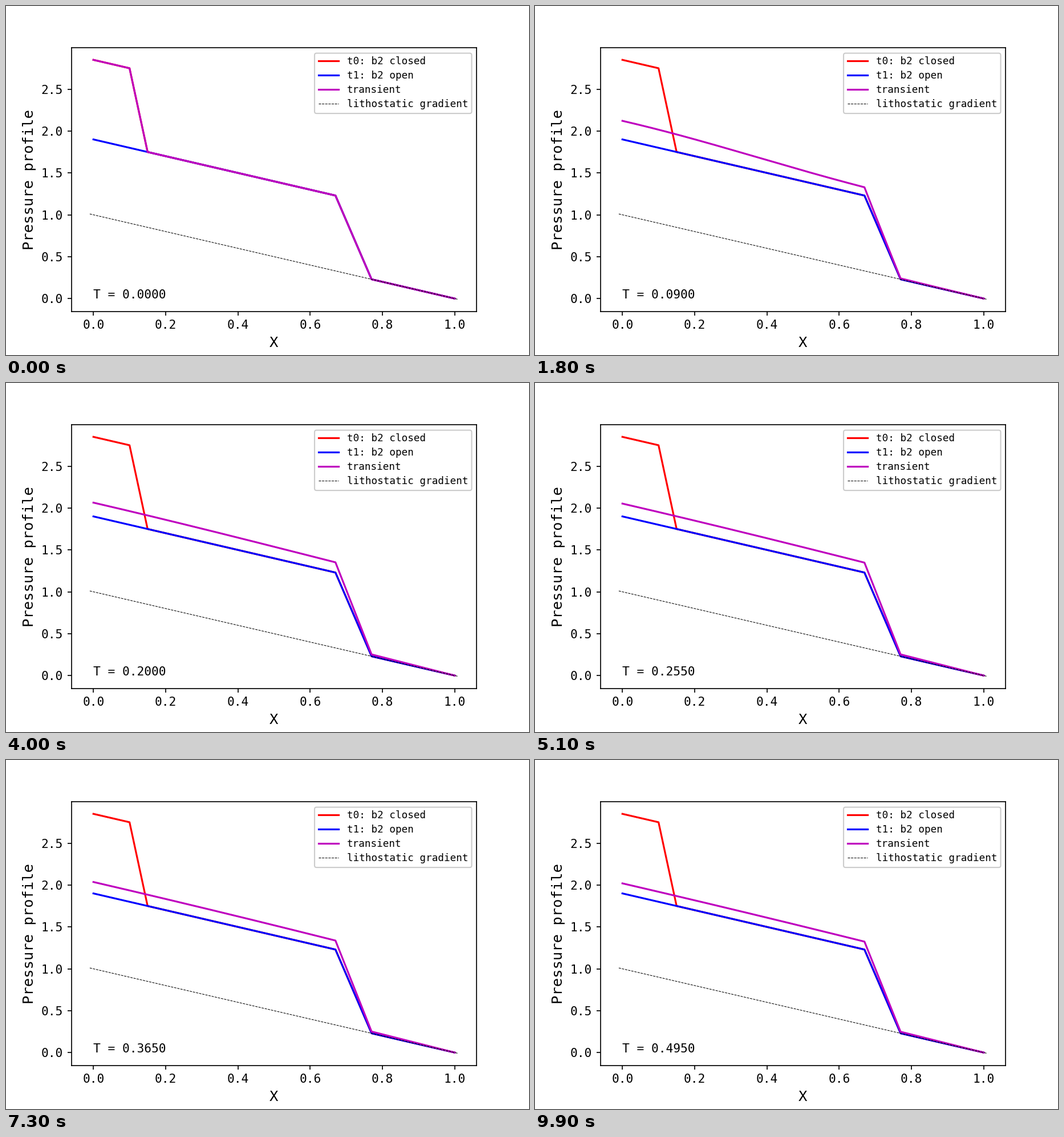
Write a matplotlib script that moves like this. It is 917x611 px and loops after 10000 ms.

```python
import numpy as np
import matplotlib.pyplot as plt
from matplotlib.animation import FuncAnimation
from matplotlib.patches import FancyBboxPatch

W, H, DPI = 917, 611, 152.75
FRAMES, INTERVAL, DT = 100, 100, 0.005

plt.rcParams.update({"font.family": "DejaVu Sans Mono", "font.size": 10})

# Pressure profiles with the second barrier closed and open
N = 200
x = np.linspace(0, 1, N + 1)
closed = np.interp(x, [0, 0.1, 0.15, 0.67, 0.77, 1], [2.85, 2.75, 1.75, 1.23, 0.23, 0])
opened = np.interp(x, [0, 0.67, 0.77, 1], [1.9, 1.23, 0.23, 0])


def diffusion_modes():
    """Decay rates and modes of u_t = (K u_x)_x, with u_x(0) = 0 and u(1) = 0."""
    h = 1 / N
    mid = (x[:-1] + x[1:]) / 2
    k = np.where((mid > 0.67) & (mid < 0.77), 0.1, 1.0) / h
    stiff = np.diag(k + np.r_[0, k[:-1]]) - np.diag(k[:-1], 1) - np.diag(k[:-1], -1)
    mass = np.full(N, h)
    mass[0] = h / 2
    root = np.sqrt(mass)
    rates, vecs = np.linalg.eigh(stiff / np.outer(root, root))
    return rates, vecs, root


rates, vecs, root = diffusion_modes()
coef = vecs.T @ (root * (closed - opened)[:-1])


def pressure(t):
    excess = vecs @ (coef * np.exp(-rates * t)) / root
    return opened + np.r_[excess, 0]


fig = plt.figure(figsize=(6.0033, 4), dpi=DPI, facecolor="white")
ax = fig.add_axes([0.125, 0.125, 0.775, 0.755])
ax.set(xlim=(-0.061, 1.061), ylim=(-0.153, 2.993),
       xticks=np.arange(0, 1.01, 0.2), yticks=np.arange(0, 2.6, 0.5))
ax.set_xlabel("X", fontsize=12)
ax.set_ylabel("Pressure profile", fontsize=12)

ax.plot(x, closed, "r", lw=1.5)
ax.plot(x, opened, "b", lw=1.5)
transient, = ax.plot(x, closed, "m", lw=1.5)
ax.plot([-0.01, 1.01], [1.01, -0.01], "k--", lw=0.5)
clock = ax.text(0, 0, "")

# Legend, laid out in pixels
key = fig.add_axes([0, 0, 1, 1], xlim=(0, W), ylim=(H, 0))
key.axis("off")
key.add_patch(FancyBboxPatch((541, 82.6), 275.5, 105.5, fc="white", ec="0.8", lw=1,
                             boxstyle="round,pad=0,rounding_size=3.5"))
entries = [
    ("t0: b2 closed", "r-", 1.5),
    ("t1: b2 open", "b-", 1.5),
    ("transient", "m-", 1.5),
    ("lithostatic gradient", "k--", 0.5),
]
for i, (label, style, lw) in enumerate(entries):
    y = 95.8 + 24.9 * i
    key.plot([548, 583.4], [y, y], style, lw=lw)
    key.text(597.5, y + 6.2, label, fontsize=8.33)


def update(frame):
    t = frame * DT
    transient.set_ydata(pressure(t))
    clock.set_text(f"T = {t:.4f}")
    return transient, clock


anim = FuncAnimation(fig, update, frames=FRAMES, init_func=lambda: update(0),
                     interval=INTERVAL, repeat=True, repeat_delay=0)
plt.show()
```
